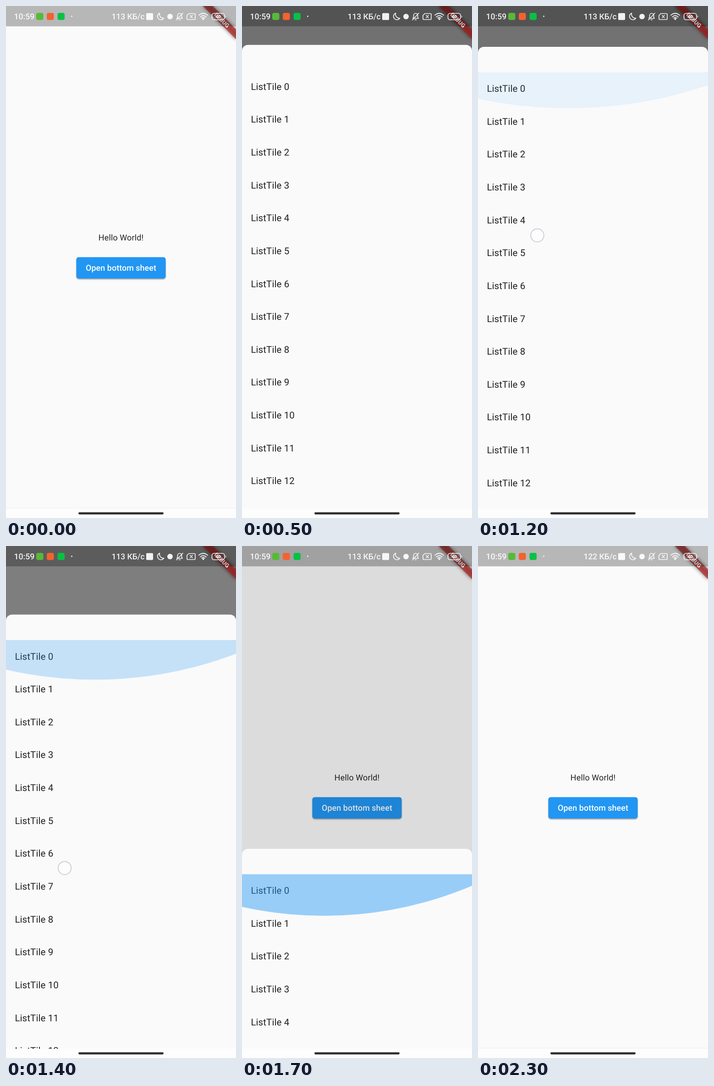
Recreate the animation shown at these times as an HTML page. Size 502x1116 px, loop 2.4 s.

```html
<!DOCTYPE html>
<html lang="en">
<head>
<meta charset="utf-8">
<title>Bottom sheet</title>
<style>
  html, body { margin: 0; width: 100%; height: 100%; overflow: hidden; background: #fafafa; }
  svg { display: block; width: 100vw; height: 100vh; font-family: Roboto, "Noto Sans", sans-serif; text-rendering: geometricPrecision; }
</style>
</head>
<body>
<svg viewBox="0 0 502 1116" preserveAspectRatio="none">
  <defs>
    <filter id="blur" x="-50%" y="-200%" width="200%" height="500%"><feGaussianBlur stdDeviation="4.5"/></filter>
    <filter id="soft" x="-10%" y="-30%" width="120%" height="160%"><feGaussianBlur stdDeviation="1.5"/></filter>
    <clipPath id="app"><rect width="502" height="1096"/></clipPath>
    <clipPath id="list"><rect y="55.5" width="502" height="1100"/></clipPath>
    <clipPath id="buttonShape"><rect x="153.5" y="547.5" width="195" height="46.5" rx="5"/></clipPath>
  </defs>

  <rect width="502" height="1116" fill="#fdfdfd"/>
  <g clip-path="url(#app)">
    <rect width="502" height="1096" fill="#fafafa"/>
    <rect y="1093" width="502" height="3" fill="#f6f6f6"/>
    <text x="251" y="510.5" text-anchor="middle" font-size="17.9" letter-spacing=".15" fill="#222">Hello World!</text>
    <rect x="154" y="549.5" width="194" height="46" rx="5" opacity=".45" filter="url(#soft)"/>
    <rect x="153.5" y="547.5" width="195" height="46.5" rx="5" fill="#2196f3"/>
    <g clip-path="url(#buttonShape)"><circle id="ripple" cx="262" cy="574" fill="#fff"/></g>
    <text x="251" y="577" text-anchor="middle" font-size="17.9" font-weight="500" letter-spacing=".06" fill="#fff">Open bottom sheet</text>
    <rect id="barrier" width="502" height="1116"/>
    <g id="sheet">
      <path d="M0 1116V13A13 13 0 0 1 13 0H489A13 13 0 0 1 502 13V1116Z" fill="#fafafa"/>
      <g id="tiles" font-size="20.45" letter-spacing=".12" fill="#212121"></g>
      <g clip-path="url(#list)"><ellipse id="glow" rx="753" fill="#2196f3"/></g>
    </g>
  </g>

  <g transform="translate(502 0) rotate(45)">
    <rect x="-51" y="35.8" width="102" height="15.4" opacity=".5" filter="url(#blur)"/>
    <rect x="-60" y="35.8" width="120" height="15.4" fill="#b71c1c" opacity=".63"/>
    <text x="0" y="48" text-anchor="middle" font-size="12.6" font-weight="900" fill="#fff">DEBUG</text>
  </g>

  <rect width="502" height="44.3" opacity=".27"/>
  <g fill="#fff" opacity=".92">
    <text x="17.5" y="29" font-size="17.6" font-weight="500">10:59</text>
    <text id="speed" x="230.5" y="29" font-size="17.4" font-weight="500"></text>
    <circle cx="143.5" cy="22.5" r="1.4"/>
    <rect x="306" y="15.5" width="15" height="15" rx="2"/>
    <circle cx="358" cy="23" r="6"/>
    <circle cx="430.5" cy="28.5" r="2"/>
    <text x="463" y="26.7" text-anchor="middle" font-size="10.5" font-weight="700">40</text>
    <path d="M479 20.5Q482 23 479 25.5Z"/>
    <g fill="none" stroke="#fff" stroke-width="1.7" stroke-linecap="round" stroke-linejoin="round">
      <path d="M335.5 15.5A7.5 7.5 0 1 0 344.5 26.5A8.5 8.5 0 0 1 335.5 15.5Z"/>
      <path d="M373 27H385L383.5 24.5V20.5A4.5 4.5 0 0 0 374.5 20.5V24.5ZM377.5 30H380.5M386 15.5L372 30.5"/>
      <path d="M399 16.5H411Q413 16.5 413 18.5V27.5Q413 29.5 411 29.5H397Q395 29.5 395 27.5V20.5ZM402 20.5L407 25.5M407 20.5L402 25.5"/>
      <path d="M421 20Q430.5 12 440 20M424 23.8Q430.5 18 437 23.8M427 26.5Q430.5 23.5 434 26.5"/>
      <rect x="449.5" y="16" width="27.5" height="14" rx="4.5"/>
    </g>
  </g>
  <rect x="66" y="15" width="15.5" height="15.5" rx="4" fill="#58b938"/>
  <rect x="89" y="15" width="15.5" height="15.5" rx="4" fill="#f4622f"/>
  <rect x="112.5" y="15" width="15.5" height="15.5" rx="4" fill="#07c145"/>

  <rect x="158" y="1103.4" width="186" height="4.8" rx="2.4" fill="#2f2f2f"/>
  <circle id="touch" r="14.3" fill="#fff" fill-opacity=".65" stroke="#cdd0dc" stroke-width="2"/>
</svg>
<script>
const LOOP = 2400, STEP = 100, OPEN_Y = 84.7, CLOSED_Y = 1116;
const LIST_TOP = 55.5, GLOW_RADIUS = 753, GLOW_HEIGHT = 100.4;
const el = id => document.getElementById(id);
const clamp = v => Math.max(0, Math.min(1, v));
const set = (node, attrs) => { for (const k in attrs) node.setAttribute(k, attrs[k]); };

// Linear interpolation through [time, value] points.
function track(points, t) {
  const i = points.findIndex(p => p[0] > t);
  if (i === 0) return points[0][1];
  if (i < 0) return points[points.length - 1][1];
  const [t0, a] = points[i - 1], [t1, b] = points[i];
  return a + (b - a) * (t - t0) / (t1 - t0);
}

const dragY = [[1100, OPEN_Y], [1200, 89], [1300, 108], [1400, 149.5], [1500, 244], [1600, 362.3], [1700, 660], [1800, CLOSED_Y]];
const fingerX = [[1000, 131], [1400, 128], [1500, 113], [1600, 93]];
const fingerY = [[900, 411], [1000, 417], [1100, 443], [1200, 500], [1300, 592], [1400, 702], [1500, 838], [1600, 973]];
const glowAlpha = [[950, 0], [1000, 0.01], [1200, 0.09], [1300, 0.16], [1400, 0.245], [1600, 0.5], [1800, 0.4]];
const glowScale = [[950, 0.5], [1200, 0.78], [1400, 0.86], [1600, 0.902]];
const glowX = [[1000, 200], [1400, 194], [1600, 179]];

for (let i = 0; i < 15; i++) {
  const tile = document.createElementNS("http://www.w3.org/2000/svg", "text");
  set(tile, { x: 19.4, y: 98.1 + i * 71.63 });
  tile.textContent = "ListTile " + i;
  el("tiles").append(tile);
}

function sheetTop(t) {
  if (t > 1100) return track(dragY, t);
  const eased = 1 - (1 - clamp((t - 170) / 250)) ** 4;
  return CLOSED_Y + (OPEN_Y - CLOSED_Y) * eased;
}

function render(t) {
  const top = sheetTop(t);
  const lowered = (top - OPEN_Y) / (CLOSED_Y - OPEN_Y);
  set(el("sheet"), { transform: `translate(0 ${top})` });
  set(el("barrier"), { opacity: 0.545 * clamp(1 - 1.39 * lowered) });

  const scale = track(glowScale, t);
  set(el("glow"), {
    cx: track(glowX, t),
    cy: LIST_TOP + (GLOW_HEIGHT - GLOW_RADIUS) * scale,
    ry: GLOW_RADIUS * scale,
    opacity: t < 1800 ? track(glowAlpha, t) : 0
  });

  const tapping = t >= 100 && t < 200;
  const dragging = t >= 900 && t < 1700;
  set(el("touch"), {
    cx: tapping ? 262 : track(fingerX, t),
    cy: tapping ? 574 : track(fingerY, t),
    opacity: tapping || dragging ? 1 : 0
  });
  set(el("ripple"), { r: clamp((t - 50) / 250) * 130, opacity: 0.22 * clamp((t - 50) / 50) * clamp((450 - t) / 200) });
  el("speed").textContent = (t < 2000 ? "113" : "122") + " КБ/c";
}

const start = performance.now();
function tick() {
  const t = (performance.now() - start) % LOOP;
  render(Math.floor(t / STEP) * STEP);
  requestAnimationFrame(tick);
}
render(0);
requestAnimationFrame(tick);
</script>
</body>
</html>
```
